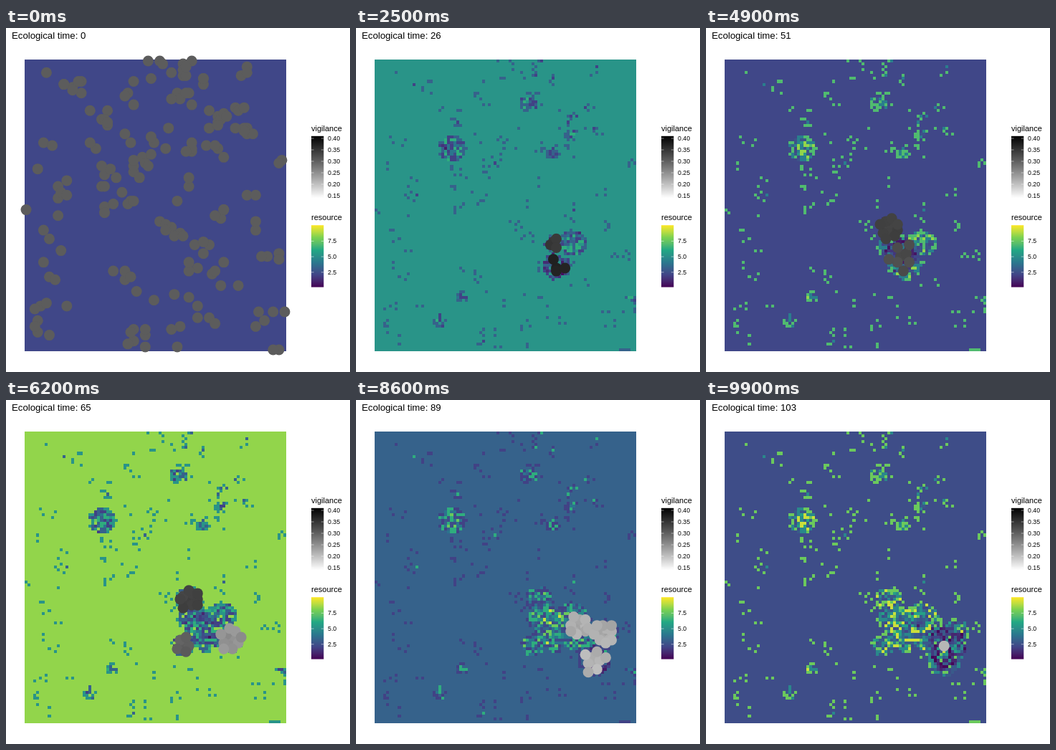
These frames come from a looping animation (480 px wide and 480 px high, 10000 ms). An HTML page:

```html
<!DOCTYPE html>
<html lang="en">
<head>
<meta charset="utf-8">
<title>Foraging</title>
<style>
  html, body { margin: 0; width: 100%; height: 100%; overflow: hidden; background: #fff; }
  svg { display: block; width: 100vw; height: 100vh; }
  text { font-family: "Liberation Sans", Arial, sans-serif; fill: #000; }
</style>
</head>
<body>
<svg viewBox="0 0 480 480">
  <defs>
    <linearGradient id="greys" x1="0" y1="1" x2="0" y2="0"></linearGradient>
    <linearGradient id="hues" x1="0" y1="1" x2="0" y2="0"></linearGradient>
  </defs>
  <text id="title" x="8" y="15" font-size="13.2"></text>
  <rect id="field" x="26" y="44" width="365" height="407" shape-rendering="crispEdges"/>
  <g id="cells" shape-rendering="crispEdges"></g>
  <g id="agents"></g>
  <g id="legend"></g>
</svg>
<script>
const FRAMES = 100, FRAME_MS = 100, LAST_TIME = 103;
const COLS = 90, ROWS = 100, LEFT = 26, TOP = 44, WIDTH = 365, HEIGHT = 407;
const CELL_W = WIDTH / COLS, CELL_H = HEIGHT / ROWS;
const CYCLE = 17, BITE = 5, GATHER_TIME = 4, START_GREY = 92;
const GOLDEN_ANGLE = Math.PI * (3 - Math.sqrt(5));
const RAMP = ['440154', '46266e', '414487', '385e8b', '2a788e', '2a9089',
              '22a884', '56bd6c', '7ad151', 'bfdd40', 'fde725'];
const GREYS = ['ffffff', 'c6c6c6', '919191', '5e5e5e', '303030', '000000'];

// Places where the scattered agents gather first.
const HUBS = [
  { x: 135, y: 167, r: 12 }, { x: 240, y: 105, r: 13 }, { x: 300, y: 149, r: 9 },
  { x: 118, y: 408, r: 9 }, { x: 385, y: 377, r: 7 }, { x: 148, y: 376, r: 9 }, { x: 275, y: 176, r: 9 }
];

// Flocks graze a disc of the field between two times.
const FLOCKS = [
  { from: 4, to: 11, x: 134, y: 168, r: 18, size: 4, grey: 92 },
  { from: 12, to: 20, x: 303, y: 301, r: 18, size: 5, grey: 60 },
  { from: 21, to: 29, x: 280, y: 333, r: 19, size: 4, grey: 34 },
  { from: 24, to: 31, x: 276, y: 300, r: 10, size: 4, grey: 56 },
  { from: 30, to: 41, x: 257, y: 303, r: 17, size: 2, grey: 72 },
  { from: 34, to: 47, x: 276, y: 307, r: 17, size: 6, grey: 88 },
  { from: 42, to: 53, x: 272, y: 319, r: 24, size: 8, grey: 75 },
  { from: 50, to: 67, x: 256, y: 279, r: 18, size: 13, grey: 66 },
  { from: 54, to: 69, x: 247, y: 342, r: 15, size: 7, grey: 95 },
  { from: 62, to: 76, x: 313, y: 335, r: 18, size: 15, grey: 146 },
  { from: 70, to: 81, x: 306, y: 300, r: 14, size: 7, grey: 178 },
  { from: 77, to: 84, x: 340, y: 346, r: 14, size: 6, grey: 174 },
  { from: 82, to: 93, x: 311, y: 315, r: 18, size: 14, grey: 172 },
  { from: 82, to: 93, x: 347, y: 326, r: 19, size: 16, grey: 172 },
  { from: 84, to: 93, x: 332, y: 363, r: 22, size: 9, grey: 180 },
  { from: 94, to: 103, x: 334, y: 344, r: 29, size: 1, grey: 187 }
];

const $ = id => document.getElementById(id);
const clamp = (v, lo, hi) => Math.max(lo, Math.min(hi, v));

function randomizer(seed) {
  return () => {
    seed = seed + 0x6D2B79F5 | 0;
    let h = Math.imul(seed ^ seed >>> 15, 1 | seed);
    h = h + Math.imul(h ^ h >>> 7, 61 | h) ^ h;
    return ((h ^ h >>> 14) >>> 0) / 4294967296;
  };
}

function hue(level) {
  const value = 2 * 1.1 ** level;
  const pos = clamp((value - 0.1) / 9.88, 0, 1) * 10;
  const i = Math.min(9, Math.floor(pos));
  const part = (hex, k) => parseInt(hex.slice(k, k + 2), 16);
  const mix = k => Math.round(part(RAMP[i], k) + (part(RAMP[i + 1], k) - part(RAMP[i], k)) * (pos - i));
  return `rgb(${mix(0)},${mix(2)},${mix(4)})`;
}

const colOf = x => clamp(Math.floor((x - LEFT) / CELL_W), 0, COLS - 1);
const rowOf = y => clamp(Math.floor((y - TOP) / CELL_H), 0, ROWS - 1);

function around(rand, { x, y }, reach) {
  const angle = rand() * 2 * Math.PI, dist = Math.sqrt(rand()) * reach;
  return { x: x + dist * Math.cos(angle), y: y + dist * Math.sin(angle) };
}

// Agents start in loose pairs and triples all over the field.
function startPlaces() {
  const rand = randomizer(11);
  const leaders = Array.from({ length: 85 }, (_, i) => ({
    x: LEFT + WIDTH * rand(),
    y: TOP + HEIGHT * (i + rand()) / 85
  }));
  const friends = Array.from({ length: 100 }, () =>
    around(rand, leaders[Math.floor(rand() * leaders.length)], 18));
  return [...leaders, ...friends];
}

const places = startPlaces();

function nearestHub({ x, y }) {
  const dist = hub => Math.hypot(hub.x - x, hub.y - y);
  return HUBS.reduce((best, hub) => dist(hub) < dist(best) ? hub : best);
}

function gatheringAgents(time) {
  const u = 1 - (1 - time / GATHER_TIME) ** 2;
  return places.map(p => {
    const hub = nearestHub(p);
    return { x: p.x + (hub.x - p.x) * u, y: p.y + (hub.y - p.y) * u, grey: START_GREY };
  });
}

function flockAgents(flock, time) {
  const rand = randomizer(time * 97 + flock.x);
  const turn = rand() * 2 * Math.PI;
  return Array.from({ length: flock.size }, (_, i) => {
    const dist = flock.r * 0.85 * Math.sqrt(i / flock.size), angle = turn + i * GOLDEN_ANGLE;
    return {
      x: flock.x + dist * Math.cos(angle),
      y: flock.y + dist * Math.sin(angle),
      grey: Math.round(flock.grey + (rand() - 0.5) * flock.grey / 8)
    };
  });
}

function drawAgent({ x, y, grey }) {
  const cx = LEFT + (colOf(x) + 0.5) * CELL_W, cy = TOP + (rowOf(y) + 0.5) * CELL_H;
  return `<circle cx="${cx}" cy="${cy}" r="7.5" fill="rgb(${grey},${grey},${grey})"/>`;
}

function drawCells(levels, base) {
  const paths = {};
  levels.forEach((level, i) => {
    if (level === base) return;
    const col = i % COLS, row = Math.floor(i / COLS);
    const x = Math.round(LEFT + col * CELL_W), right = Math.round(LEFT + (col + 1) * CELL_W);
    const y = Math.round(TOP + row * CELL_H), bottom = Math.round(TOP + (row + 1) * CELL_H);
    paths[level] = (paths[level] || '') + `M${x} ${y}H${right}V${bottom}H${x}z`;
  });
  return Object.entries(paths).map(([level, d]) => `<path fill="${hue(+level)}" d="${d}"/>`).join('');
}

// Resource grows by a tenth each step and starts over once it is full.
function simulate() {
  const rand = randomizer(5), levels = new Int16Array(COLS * ROWS).fill(1);
  const bite = ({ x, y }) => {
    const cell = rowOf(y) * COLS + colOf(x);
    levels[cell] = Math.max(-28, levels[cell] - BITE);
  };
  const graze = (disc, steps) => {
    const cells = Math.PI * disc.r ** 2 / (CELL_W * CELL_H);
    for (let i = 0; i < 2 * cells / steps; i++) bite(around(rand, disc, disc.r));
  };

  return Array.from({ length: LAST_TIME + 1 }, (_, time) => {
    if (time) levels.forEach((level, i) => { levels[i] = level + 1 < CYCLE ? level + 1 : 0; });
    if (time === 0) places.forEach(bite);
    if (time === 1) places.forEach(p => { if (rand() < 0.5) bite(around(rand, p, 9)); });
    if (time > 0 && time < GATHER_TIME) HUBS.forEach(hub => graze(hub, 6));

    const active = FLOCKS.filter(f => time >= f.from && time <= f.to);
    active.forEach(f => graze(f, f.to - f.from + 1));
    const agents = time < GATHER_TIME ? gatheringAgents(time) : active.flatMap(f => flockAgents(f, time));
    const base = (time + 1) % CYCLE;
    return { field: hue(base), cells: drawCells(levels, base), agents: agents.map(drawAgent).join('') };
  });
}

function fillGradient(id, colors) {
  $(id).innerHTML = colors.map((c, i) =>
    `<stop offset="${i / (colors.length - 1)}" stop-color="#${c}"/>`).join('');
}

function legend(name, top, paint, labels, first, step) {
  const ticks = labels.map((label, i) => {
    const y = first + i * step;
    return `<path d="M426 ${y}h3.5M439.8 ${y}h3.5" stroke="#fff" stroke-width=".5"/>
      <text x="449" y="${Math.round(y + 3)}" font-size="8.8">${label}</text>`;
  });
  return `<text x="426" y="${Math.round(top - 7)}" font-size="11">${name}</text>
    <rect x="426" y="${top}" width="17.3" height="86.4" fill="url(#${paint})"/>${ticks.join('')}`;
}

fillGradient('greys', GREYS);
fillGradient('hues', RAMP);
$('legend').innerHTML =
  legend('vigilance', 150.8, 'greys', ['0.40', '0.35', '0.30', '0.25', '0.20', '0.15'], 154, 16) +
  legend('resource', 275.2, 'hues', ['7.5', '5.0', '2.5'], 297.4, 21.7);

const states = simulate();
let shown = -1;

function render(ms) {
  const frame = Math.floor(ms / FRAME_MS) % FRAMES;
  if (frame === shown) return;
  shown = frame;
  const time = Math.round(frame * LAST_TIME / (FRAMES - 1));
  const state = states[time];
  $('title').textContent = `Ecological time: ${time}`;
  $('field').setAttribute('fill', state.field);
  $('cells').innerHTML = state.cells;
  $('agents').innerHTML = state.agents;
}

const start = performance.now();
function tick() {
  render(performance.now() - start);
  requestAnimationFrame(tick);
}
tick();
</script>
</body>
</html>
```
